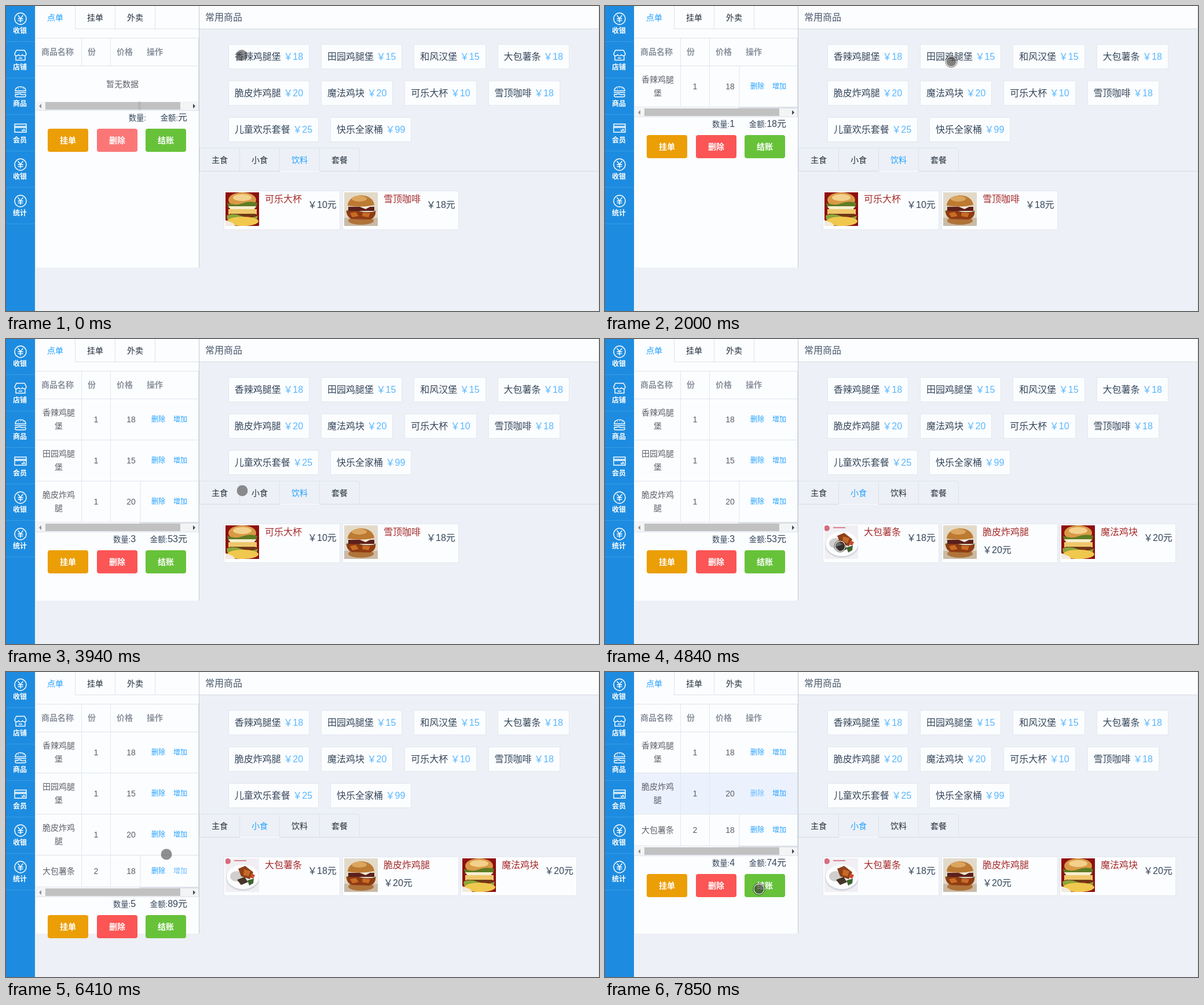
Recreate the animation shown at these times as an HTML page. Size 1024 by 527 pixels, loop 8000 ms.

```html
<!DOCTYPE html>
<html lang="zh-CN">
<head>
<meta charset="utf-8">
<title>收银台</title>
<style>
html, body { margin: 0; width: 100%; height: 100%; overflow: hidden; background: #edf0f6; }
#stage { position: relative; width: 1024px; height: 527px; overflow: hidden; background: #edf0f6; color: #34465a; }
#stage, .btn { font: 16px "Liberation Sans", "Noto Sans CJK SC", "Noto Sans CJK", sans-serif; }
#stage div { position: absolute; box-sizing: border-box; white-space: nowrap; }
#stage svg { position: absolute; overflow: visible; }
#stage .t { height: 20px; line-height: 20px; }
#stage .row { display: flex; gap: 20px; }
.row span { padding: 0 10px; border: 1px solid #e2e7f0; background: #fcfdff; height: 41px; line-height: 42px; }
.row b { color: #58b7ff; font-weight: 400; }
#stage .card { background: #fcfdff; border: 1px solid #e3e8f1; }
#stage .hit { background: #d7d8d9; }
#stage .btn { width: 70px; height: 40px; border-radius: 4px; color: #fff; font-size: 14px; font-weight: bold; line-height: 40px; text-align: center; }
small { font-size: 13.33px; }
</style>
</head>
<body>
<div id="stage"><div id="base"></div><div id="order"></div><div id="menu"></div>
<svg id="cursor" width="1" height="1"></svg></div>
<script>
const LOOP = 8000, HOLD = 130, BLUE = '#20a0ff', LINE = '#dde3ec', PAPER = '#fcfdff', INK = '#34465a', GRAY = '#5c6068';
const $ = id => document.getElementById(id);
const fill = (x, y, w, h, css, cls = '') =>
  `<div class="${cls}" style="left:${x}px;top:${y}px;width:${w}px;height:${h}px;background:${css}"></div>`;
const text = (x, yc, s, size, color, css = '') =>
  `<div class="t" style="left:${x}px;top:${yc - 10}px;font-size:${size}px;color:${color};${css}">${s}</div>`;
const mid = (xc, yc, s, size, color, css = '') =>
  text(xc - 50, yc, s, size, color, 'width:100px;text-align:center;' + css);

const goods = {
  spicy: ['香辣鸡腿堡', 18], garden: ['田园鸡腿堡', 15], wafu: ['和风汉堡', 15], fries: ['大包薯条', 18],
  crispy: ['脆皮炸鸡腿', 20], nugget: ['魔法鸡块', 20], cola: ['可乐大杯', 10], coffee: ['雪顶咖啡', 18],
  kids: ['儿童欢乐套餐', 25], family: ['快乐全家桶', 99]
};
const ids = Object.keys(goods);
const drinks = [['cola', 'red'], ['coffee', 'cream']];
const snacks = [['fries', 'plate'], ['crispy', 'cream'], ['nugget', 'red']];

// What each press does
const taps = [
  [400, 'add', 'spicy'], [2000, 'add', 'garden'], [3370, 'add', 'crispy'], [4210, 'tab'],
  [4840, 'add', 'fries'], [5780, 'more', 'fries'], [7040, 'drop', 'garden']
];
// Cursor path: first step, arrival, x, y
const stops = [
  [0, 0, 407, 84.5], [1340, 1880, 598, 96], [2570, 2810, 472, 159], [3640, 3640, 398, 163.5], [3790, 3790, 398, 246],
  [3940, 4090, 417.5, 278.5], [4600, 4840, 406, 358], [5230, 5500, 303, 351], [6170, 6410, 276.5, 314.5],
  [6530, 6650, 262, 277], [6800, 7040, 255.5, 204.5], [7430, 7550, 246, 266], [7700, 7850, 265.5, 374.5]
];

// Sidebar icons, drawn around (0,0)
const yen = '<circle r="10"/><path d="M-4.5-6 0-.5 4.5-6M0-.5V6.5M-4.5 0H4.5M-4.5 3.4H4.5"/>';
const icons = [
  [yen, '收银'],
  ['<path d="M-7-8.5H7L10-2.5C10 2 4 2 3.4-1.5 3 2-3 2-3.4-1.5-4 2-10 2-10-2.5ZM-8 1.5V8.5H8V1.5M-3 5H3"/>', '店铺'],
  ['<path d="M-9-1.5C-9-11 9-11 9-1.5ZM-10 1.5H10M-9 4C-6 7-4 3-1 4S5 7 9 4M-9 5V8Q-9 9-7 9H7Q9 9 9 8V5M-4-5H-3M0-6.5H1M4-5H5"/>', '商品'],
  ['<path d="M-10-7H10V7H-10ZM-10-3H10M-10-1H10M2 3 4 5 6 2 8 5"/>', '会员'],
  [yen, '收银'],
  [yen, '统计']
];

const photo = {
  red: `<path fill="#8f1010" d="M0 0H58V58H0Z"/><ellipse cx="29" cy="13" rx="24" ry="13" fill="#d99a45"/>
    <ellipse cx="29" cy="9" rx="16" ry="6" fill="#f3d08c"/><path fill="#5f7c24" d="M3 18Q17 24 29 19T55 18L53 27H5Z"/>
    <path fill="#f7edcf" d="M5 24H53L49 30H9Z"/><path fill="#eec76c" d="M5 29H54V38H5Z"/><path fill="#6f3816" d="M7 37H52V42H7Z"/>
    <path fill="#8ca53a" d="M2 40Q14 35 28 41T56 40L54 47H3Z"/><ellipse cx="30" cy="50" rx="27" ry="8" fill="#f0c84e"/>
    <path fill="#f2eadc" d="M0 48 13 53 17 58H0Z"/>`,
  cream: `<path fill="#e2dac9" d="M0 0H58V58H0Z"/><path fill="#c9baa5" d="M0 44H58V58H0Z"/>
    <ellipse cx="29" cy="49" rx="22" ry="7" fill="#b0733a"/><path fill="#5a7a2b" d="M3 32Q16 27 29 33T55 31L52 41H7Z"/>
    <path fill="#8f3c14" d="M4 33Q12 28 24 32T54 33Q55 44 43 47L13 46Q4 42 4 33Z"/><path fill="#c96d25" d="M10 36 20 34 25 41 14 43ZM32 35 45 36 42 43 31 41Z"/>
    <path fill="#5c1f1b" d="M7 25H52V32H7Z"/><path fill="#f0e7d4" d="M8 22 52 21 37 29 27 25Z"/>
    <path fill="#bd7a33" d="M6 23C7 0 50-1 52 22Q29 27 6 23Z"/><ellipse cx="26" cy="11" rx="13" ry="5" fill="#dba55f"/>`,
  plate: `<path fill="#f1eff3" d="M0 0H58V58H0Z"/><circle cx="4" cy="5" r="5" fill="#d66c7e"/><path fill="#d98590" d="M15 3H36V5H15Z"/>
    <ellipse cx="30" cy="34" rx="29" ry="22" fill="#d3d7df"/><ellipse cx="30" cy="32" rx="28" ry="21" fill="#fcfdfe"/>
    <ellipse cx="19" cy="31" rx="11" ry="9" fill="#d0cfce"/><path fill="#8f4019" d="M22 18 34 13 48 24 42 36 27 31Z"/>
    <path fill="#c56a28" d="M32 19 43 22 40 31 31 29Z"/><path fill="#453528" d="M20 37 33 32 39 41 27 46Z"/>
    <path fill="#3d6430" d="M38 38 49 35 48 43 41 47Z"/><path fill="#cc4a2c" d="M45 26 51 29 48 35 42 33Z"/>`
};

function drawBase() {
  let h = fill(0, 0, 50, 527, '#1d8ce0');
  icons.forEach(([art, label], i) => {
    const y = i * 63;
    h += `<svg style="left:24.5px;top:${y + 22}px" width="1" height="1"><g fill="none" stroke="#fff" stroke-width="1.4">${art}</g></svg>`
      + mid(24, y + 43, label, 12, '#fff', 'font-weight:bold') + fill(0, y + 61, 50, 1, '#3a9be6');
  });
  h += fill(50, 0, 283, 452, PAPER) + fill(333, 0, 1, 452, '#c3c9d2')
    + fill(334, 0, 690, 39, PAPER) + fill(334, 39, 690, 1, '#d3d9e2') + fill(1023, 0, 1, 527, '#dce1e9')
    + text(344, 20, '常用商品', 16, '#48576a');
  ['点单', '挂单', '外卖'].forEach((s, i) => {
    h += text(71 + 69 * i, 20, s, 14, i ? '#222d3a' : BLUE) + fill(119 + 69 * i, 0, 1, 39, LINE);
  });
  h += fill(50, 0, 1, 452, '#e3e8ef') + fill(119, 39, 214, 1, LINE);
  for (let r = 0; r < 3; r++) {
    h += `<div class="row" style="left:383.8px;top:${66 + 63 * r}px">`
      + ids.slice(4 * r, 4 * r + 4).map(id => `<span id="${id}">${goods[id][0]} <b>￥${goods[id][1]}</b></span>`).join('') + '</div>';
  }
  $('base').innerHTML = h;
}

// Replay the first n taps
function cart(n) {
  const rows = [];
  let touched = -1, act = '';
  for (const [, what, id] of taps.slice(0, n)) {
    if (what == 'tab') continue;
    const i = rows.findIndex(r => r[0] == id);
    if (what == 'add') rows.push([id, 1]);
    if (what == 'more') rows[i][1]++;
    if (what == 'drop') rows.splice(i, 1);
    touched = i < 0 ? rows.length - 1 : i;
    act = what;
  }
  return { rows, touched, act };
}

function drawOrder(n) {
  const { rows, touched, act } = cart(n), soft = '#66b8ff';
  let h = fill(51, 55, 282, 1, LINE) + fill(51, 103, 282, 1, LINE), y = 104, count = 0, sum = 0, edge = 0;
  [[61, '商品名称'], [141, '份'], [191, '价格'], [243, '操作']].forEach(([x, s]) => {
    h += text(x, 79, s, 14, '#8b929d', 'font-weight:bold');
  });
  rows.forEach(([id, k], i) => {
    const [name, price] = goods[id], two = name.length > 4, tall = two ? 71 : 55, c = y + (two ? 35 : 27);
    const link = what => i == touched && act == what ? soft : BLUE;
    if (i == touched) edge = y;
    if (i == touched && act == 'drop') h += fill(51, y, 281, tall - 1, '#ebf2fe');
    h += mid(91, two ? c - 12 : c, name.slice(0, 4), 14, GRAY) + mid(91, c + 11, name.slice(4), 14, GRAY)
      + mid(155.5, c, k, 14, GRAY) + mid(216, c, price, 14, GRAY)
      + text(251, c, '删除', 12, link('drop')) + text(289, c, '增加', 12, link('more'))
      + fill(51, y + tall - 1, 281, 1, LINE);
    y += tall; count += k; sum += k * price;
  });
  const end = y;
  if (!count) { y = 164; h += mid(201, 135, '暂无数据', 14, GRAY); }
  for (const x of [130, 180]) h += fill(x, 56, 1, end - 56, '#e2e7ef');
  h += fill(332, 55, 1, y - 38, LINE) + fill(51, y + 1, 281, 15, '#f3f4f6') + fill(68, y + 2, 233, 13, '#c1c1c1');
  // Edge shadow of the fixed column
  h += count ? fill(231, edge, 2, y - edge, '#eef1f5') + fill(230, y, 102, 2, '#dddfe3') : fill(228, y, 5, 16, 'rgba(0,0,0,.06)');
  h += `<svg style="left:0;top:${y + 8.5}px" width="1" height="1"><path d="M57 0 61-4V4Z" fill="#8f9196"/><path d="M327 0 323-4V4Z" fill="#44474c"/></svg>`
    + fill(51, y + 16, 282, 1, LINE)
    + text(63, y + 29, `<small>数量:</small>${count || ''}<i style="margin-left:24.6px"></i><small>金额:</small>${sum || ''}元`, 16, INK, 'width:250px;text-align:right');
  [[72, '挂单', '#eb9e05'], [157, '删除', count ? '#fb5555' : '#fb7777'], [241, '结账', '#67c23a']].forEach(([x, s, c]) => {
    h += `<div class="btn" style="left:${x}px;top:${y + 48}px;background:${c}">${s}</div>`;
  });
  $('order').innerHTML = h;
}

function drawMenu(snack) {
  const active = snack ? 1 : 2;
  let h = `<div style="left:334px;top:245px;width:277px;height:41px;border:1px solid ${LINE};border-bottom:0;border-radius:0 4px 0 0"></div>`
    + fill(334, 285, 690, 1, '#d6dde7');
  ['主食', '小食', '饮料', '套餐'].forEach((s, i) => {
    const x = 334 + 69 * i;
    h += mid(x + 35, 266, s, 14, i == active ? BLUE : '#222d3a');
    if (i < 3) h += fill(x + 69, 246, 1, 39, LINE);
    if (i == active) h += fill(x + 1, 285, 68, 1, PAPER);
  });
  (snack ? snacks : drinks).forEach(([id, pic], i) => {
    const [name, price] = goods[id], x = 376 + Math.round(204.5 * i), wide = name.length > 4;
    h += `<div class="card" id="card-${id}" style="left:${x}px;top:319px;width:201px;height:68px"></div>`
      + `<svg style="left:${x + 3}px;top:322px;overflow:hidden" width="58" height="58">${photo[pic]}</svg>`
      + text(x + 71, 334, name, 16, '#a52a2a')
      + text(x + (wide ? 71 : 145), wide ? 365 : 344, `￥${price}元`, 16, INK);
  });
  $('menu').innerHTML = h;
}

// Flash the item or card just added
function flash(tap) {
  document.querySelectorAll('.hit').forEach(e => e.classList.remove('hit'));
  if (tap && tap[1] == 'add') ($('card-' + tap[2]) || $(tap[2])).classList.add('hit');
}

const smooth = p => p * p * p * (p * (6 * p - 15) + 10);
const dot = '<circle r="9.5" fill="rgba(60,60,60,.57)"/>';
const ring = '<circle r="9" fill="rgba(45,45,45,.6)"/><circle r="9" fill="none" stroke="#eee" stroke-width="1.3"/><circle r="10.1" fill="none" stroke="rgba(0,0,0,.65)" stroke-width=".9"/>';

// The cursor moves in visible steps of about HOLD ms
function cursorAt(t) {
  const i = stops.findLastIndex(s => s[0] <= t), [from, to, x, y] = stops[i];
  const [, , px, py] = stops[Math.max(0, i - 1)];
  const n = Math.round((to - from) / HOLD), step = (to - from) / n || 1;
  const p = smooth(Math.min(1, (Math.floor((t - from) / step + 1e-6) + 1) / (n + 1)));
  return [px + (x - px) * p, py + (y - py) * p];
}

const seen = {};
function once(key, value, draw) { if (seen[key] !== value) { seen[key] = value; draw(value); } }

function frame(t) {
  const done = taps.filter(a => t >= a[0] + HOLD).length;
  const down = t >= 7850 || taps.some(a => t >= a[0] && t < a[0] + HOLD);
  once('order', done, drawOrder);
  once('menu', taps.slice(0, done).some(a => a[1] == 'tab'), drawMenu);
  once('flash', taps.find(a => t >= a[0] + HOLD && t < a[0] + 2 * HOLD), flash);
  once('ring', down, d => { $('cursor').innerHTML = d ? ring : dot; });
  const [x, y] = cursorAt(t);
  $('cursor').style.left = x + 'px';
  $('cursor').style.top = y + 'px';
}
drawBase();
const start = performance.now();
(function tick() {
  frame((performance.now() - start) % LOOP);
  requestAnimationFrame(tick);
})();
</script>
</body>
</html>
```
